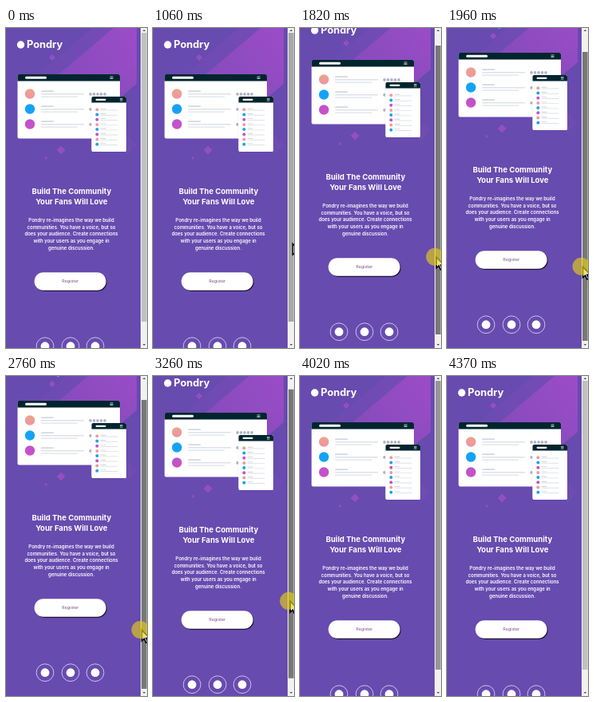
These frames come from a looping animation (177 px wide and 401 px high, 5120 ms). An HTML page with a canvas:

```html
<!DOCTYPE html>
<html lang="en">
<head>
<meta charset="utf-8">
<title>Landing page scroll</title>
<style>
html, body { margin: 0; width: 100%; height: 100%; overflow: hidden; background: #674baf; }
canvas { display: block; width: 177px; height: 401px; }
</style>
</head>
<body>
<canvas id="stage"></canvas>
<script>
const W = 177, H = 401, LOOP = 5120;
const PAGE = '#674baf', DARK = '#00252e', FONT = 'Inter, "Open Sans", sans-serif';
// Top and bottom colour of each avatar
const AVATARS = [['#e9a58f', '#f0939f'], ['#14a2f7', '#14a2f7'], ['#b855d0', '#d04fc2']];

const canvas = document.getElementById('stage');
const ctx = canvas.getContext('2d');
const dpr = window.devicePixelRatio || 1;
canvas.width = Math.round(W * dpr);
canvas.height = Math.round(H * dpr);

// Pointer path: time, x, y of the tip
const PATH = [
  [1060, 175, 270], [1200, 172, 270], [1550, 172, 270], [1680, 171.5, 274],
  [1960, 170, 299], [2020, 170, 302], [2300, 170, 322], [2700, 170, 322],
  [2760, 170, 318], [3300, 172, 277], [3470, 175, 266], [3820, 178, 262]
];
const STARTS = [0, 460, 1060, 1550, 2760, 4020];
const PRESS = 1550, RELEASE = 4020, IDLE = 4360;
const GRAB_Y = 271, SCROLL_MAX = 27, THUMB_MAX = 24;

const clamp = (v, lo, hi) => Math.min(hi, Math.max(lo, v));
const mix = (a, b, k) => a + (b - a) * k;

function stepTime(t) {
  const start = STARTS.filter(s => s <= t).pop();
  return start + Math.floor((t - start + 8) / 68) * 68;
}

function pointerAt(t) {
  let i = 0;
  while (i < PATH.length - 2 && PATH[i + 1][0] <= t) i++;
  const [ta, xa, ya] = PATH[i], [tb, xb, yb] = PATH[i + 1];
  const k = clamp((t - ta) / (tb - ta), 0, 1);
  return { x: mix(xa, xb, k), y: mix(ya, yb, k) };
}

function rect(x, y, w, h, color, r = 0) {
  ctx.fillStyle = color;
  ctx.beginPath();
  ctx.roundRect(x, y, w, h, r);
  ctx.fill();
}

function disc(x, y, r, color) {
  ctx.fillStyle = color;
  ctx.beginPath();
  ctx.arc(x, y, r, 0, Math.PI * 2);
  ctx.fill();
}

function poly(points, color) {
  ctx.fillStyle = color;
  ctx.beginPath();
  points.forEach(([x, y]) => ctx.lineTo(x, y));
  ctx.closePath();
  ctx.fill();
}

function diamond(x, y, r, color) {
  poly([[x - r, y], [x, y - r], [x + r, y], [x, y + r]], color);
}

function text(str, x, y, size, weight, color = '#fff', align = 'center') {
  ctx.font = `${weight} ${size}px ${FONT}`;
  ctx.textAlign = align;
  ctx.fillStyle = color;
  ctx.fillText(str, x, y);
}

function fade(x0, y0, x1, y1, from, to) {
  const g = ctx.createLinearGradient(x0, y0, x1, y1);
  g.addColorStop(0, from);
  g.addColorStop(1, to);
  return g;
}

function avatar(x, y, r, i) {
  disc(x, y, r, fade(x, y - r, x, y + r, ...AVATARS[i % AVATARS.length]));
}

function drawBackdrop() {
  poly([[108, 0], [164, 0], [164, 48], [30, 160], [0, 148], [0, 92]],
    fade(0, 120, 150, 0, 'rgba(150,75,196,0)', 'rgba(150,75,196,.3)'));
  poly([[135, 0], [164, 0], [164, 70], [92, 130], [33, 86]],
    fade(60, 80, 160, 10, 'rgba(158,76,200,.4)', 'rgba(158,76,200,.9)'));
  diamond(58, 37, 4.2, '#934fbf');
  diamond(69, 153, 5.5, '#934fbf');
  diamond(50, 163, 2.3, '#8850bb');
  diamond(151, 146, 13, 'rgba(120,78,184,.5)');
}

function menuIcon(x, y, w) {
  for (let i = 0; i < 3; i++) rect(x, y + i * 1.3, w, 0.6, '#fff');
}

function panel(x, y, w, h, head) {
  rect(x, y, w, h, '#fff', 2);
  rect(x, y, w, head, DARK, [2, 2, 0, 0]);
}

function drawMockups() {
  panel(14.5, 58, 128.5, 80.5, 8.5);
  rect(24, 60.7, 27, 3, '#fff', 1.5);
  menuIcon(130.5, 60.6, 4);
  for (let i = 0; i < 3; i++) {
    const y = 82.5 + i * 19;
    avatar(30, y, 6.2, i);
    rect(44, y - 4.2, 16, 1.7, '#d3d9e1', 0.8);
    rect(44, y - 0.4, 54, 1.3, '#dde2e8', 0.6);
    rect(44, y + 3, 46, 1.3, '#dde2e8', 0.6);
    for (let d = 0; d < 5; d++) disc(106 + d * 4.5, y + 0.4, 1.8, '#aeb2c6');
  }

  ctx.save();
  ctx.shadowColor = 'rgba(40,30,80,.2)';
  ctx.shadowBlur = 2 * dpr;
  rect(107.5, 86, 43.5, 69, '#fff', 2);
  ctx.restore();
  panel(107.5, 86, 43.5, 69, 7.5);
  rect(112.5, 88.7, 13, 2.2, '#fff', 1.1);
  menuIcon(143, 88.2, 3.5);
  for (let i = 0; i < 8; i++) {
    const y = 102.3 + i * 6.2;
    avatar(114.3, y, 2, i);
    rect(118.5, y - 1.5, 7, 0.9, '#cdd4dd', 0.4);
    rect(118.5, y + 0.3, 22, 0.9, '#dce1e8', 0.4);
  }
}

function drawCopy() {
  disc(18.5, 21, 4.7, '#fff');
  text('Pondry', 26, 25.4, 12.8, 700, '#fff', 'left');

  text('Build The Community', 82.3, 207.5, 9.5, 700);
  text('Your Fans Will Love', 82.3, 220.5, 9.5, 700);
  [
    'Pondry re-imagines the way we build',
    'communities. You have a voice, but so',
    'does your audience. Create connections',
    'with your users as you engage in',
    'genuine discussion.'
  ].forEach((line, i) => text(line, 82, 242.9 + i * 8.65, 6, 600));

  rect(36.6, 307.3, 90, 22.6, '#1b1230', 11.3);
  rect(35.6, 306.2, 90, 22.6, '#fff', 11.3);
  text('Register', 80.7, 319.4, 5.4, 400, '#80508f');

  [49, 81, 112].forEach(x => {
    ctx.strokeStyle = '#e6dff4';
    ctx.lineWidth = 0.8;
    ctx.beginPath();
    ctx.arc(x, 398.7, 10.9, 0, Math.PI * 2);
    ctx.stroke();
    disc(x, 398.7, 5.4, '#fff');
  });
}

function drawScrollbar(scroll, shade) {
  rect(169, 0, 8, H, '#f1f1f1');
  poly([[173.4, 1.9], [175.2, 4], [171.6, 4]], '#505050');
  poly([[171.6, 396], [175.2, 396], [173.4, 398.1]], '#505050');
  const y = 6 + scroll * THUMB_MAX / SCROLL_MAX;
  rect(170, y, 6.6, 362, `rgb(${shade},${shade},${shade})`);
}

function drawCursor(x, y) {
  ctx.save();
  ctx.translate(x, y);
  ctx.lineJoin = 'miter';
  ctx.lineWidth = 1.6;
  ctx.strokeStyle = '#000';
  poly([[0.5, 0.5], [0.5, 14], [3.6, 11.2], [5.8, 16.2], [8, 15.2], [5.9, 10.4], [10, 10.2]], '#fff');
  ctx.stroke();
  ctx.restore();
}

function draw(time) {
  const t = stepTime(time);
  const p = pointerAt(t);
  const held = t >= PRESS && t < RELEASE;
  const leaving = clamp((t - RELEASE) / (IDLE - RELEASE), 0, 1);
  const drag = (p.y - GRAB_Y) * SCROLL_MAX / THUMB_MAX;
  const scroll = held ? Math.round(clamp(drag, 0, SCROLL_MAX)) : 0;
  const hover = (t >= 460 && t < 526) || (t >= 1060 && t < PRESS);
  let shade = 193;
  if (hover) shade = 168;
  else if (held) shade = 120;
  else if (t >= RELEASE) shade = Math.round(mix(150, 193, leaving));

  ctx.setTransform(dpr, 0, 0, dpr, 0, 0);
  rect(0, 0, W, H, PAGE);
  ctx.save();
  ctx.translate(0, -scroll);
  drawBackdrop();
  drawMockups();
  drawCopy();
  ctx.restore();
  drawScrollbar(scroll, shade);

  if (hover || held) drawCursor(p.x, p.y);
  if (held) disc(p.x - 1.5, p.y, 11, 'rgba(229,206,21,.65)');
}

const begin = performance.now();
function tick() {
  draw((performance.now() - begin) % LOOP);
  requestAnimationFrame(tick);
}
tick();
</script>
</body>
</html>
```
